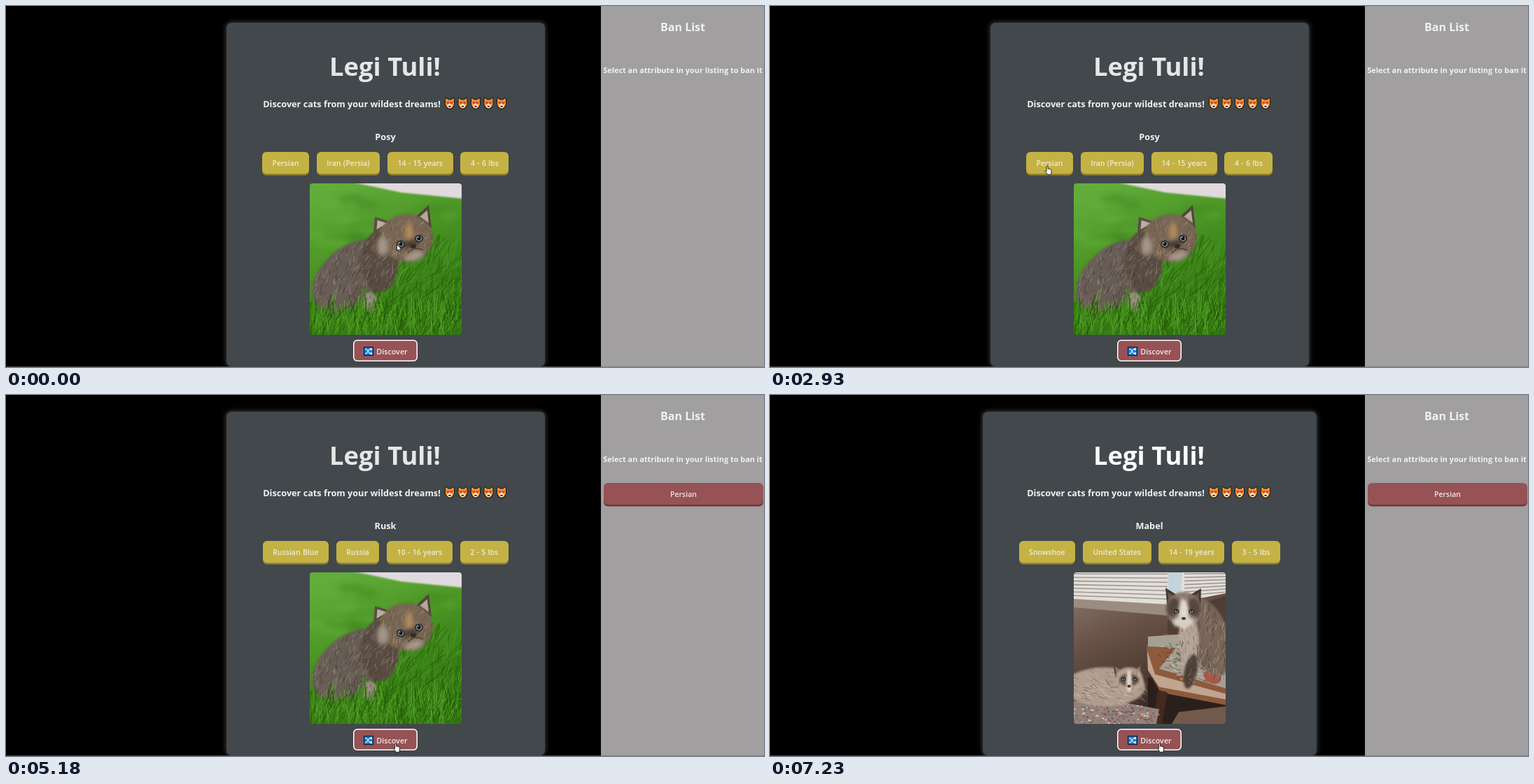
An HTML page with a canvas that plays this animation: 1083 by 517 pixels, repeating every 8 s.

```html
<!DOCTYPE html>
<html lang="en">
<head>
<meta charset="utf-8">
<title>Cat discovery</title>
<style>
html, body { margin: 0; width: 100%; height: 100%; overflow: hidden; background: #000; }
#stage { position: relative; width: 1083px; height: 517px; overflow: hidden; background: #000;
  font-family: "Open Sans", "Noto Sans", sans-serif; color: #f1f2f2; }
#stage > * { position: absolute; box-sizing: border-box; }
#frame { left: 0; top: 24px; width: 1085px; height: 492px; display: flex; justify-content: center; }
#card { display: flex; gap: 10.8px; padding: 185px 52px 0 51.5px; border-radius: 7px; background: #42484b;
  align-items: flex-start; box-shadow: 0 0 6px 1px rgba(140, 128, 126, .45); }
#side { left: 850px; top: 0; width: 233px; height: 517px; background: #a19f9f; }
#edge { left: 0; top: 516px; width: 1083px; height: 1px; background: rgba(105, 118, 118, .5); }
.text { width: 400px; height: 60px; line-height: 60px; text-align: center; white-space: nowrap; }
.btn { height: 31px; line-height: 33px; border-radius: 6px; text-align: center; white-space: nowrap;
  font-size: 10.5px; font-weight: 600; word-spacing: .6px; }
.tag { padding: 0 14.5px; background: #c4b245; color: #eeebd6; box-shadow: 0 2.5px 0 #968a32; }
.red { background: #965254; color: #f0e8e8; box-shadow: 0 2.5px 0 #6d3739; }
.tag.on { box-shadow: inset 0 0 0 1.5px #fff, 0 2.5px 0 #968a32; }
.red.on { box-shadow: inset 0 0 0 1.5px #fff; }
#discover { left: 496px; top: 478px; width: 92px; padding-left: 19px; font-size: 10.8px; }
#banned { left: 854px; top: 126px; width: 228px; }
.photo { left: 434px; top: 254px; border-radius: 4px; }
.over { left: 0; top: 0; }
</style>
</head>
<body>
<div id="stage">
  <div id="frame"><div id="card"></div></div>
  <div id="side"></div>
  <div id="discover" class="btn red">Discover</div>
  <div id="banned" class="btn red">Persian</div>
  <div id="edge"></div>
</div>
<script>
const W = 1083, H = 517, LOOP = 8000, SIZE = 217;
const $ = id => document.getElementById(id);
const stage = $('stage'), card = $('card');

function text(label, cx, cy, size) {
  const el = document.createElement('div');
  el.className = 'text';
  el.textContent = label;
  el.style.cssText = `left:${cx - 200}px; top:${cy - 30}px; font-size:${size}px; font-weight:700`;
  return stage.appendChild(el);
}
function canvas(w, h, cls) {
  const el = document.createElement('canvas');
  el.className = cls;
  el.width = w;
  el.height = h;
  return stage.appendChild(el);
}
function randomizer(seed) {
  return () => (seed = (seed * 16807) % 2147483647) / 2147483647;
}

function oval(g, fill, x, y, rx, ry = rx, turn = 0) {
  g.fillStyle = fill;
  g.beginPath();
  g.ellipse(x, y, rx, ry, turn, 0, 7);
  g.fill();
}
function poly(g, fill, ...pts) {
  g.fillStyle = fill;
  g.beginPath();
  pts.forEach(p => g.lineTo(...p));
  g.fill();
}
function backdrop(g, ...cols) {
  const f = g.createLinearGradient(60, 0, 150, SIZE);
  cols.forEach((c, i) => f.addColorStop(i / (cols.length - 1), c));
  g.fillStyle = f;
  g.fillRect(0, 0, SIZE, SIZE);
}
function soft(g, blur, draw) {
  g.filter = `blur(${blur}px)`;
  draw();
  g.filter = 'none';
}
// Short random strokes spread over a turned ellipse
function hairs(g, seed, n, [x, y, rx, ry, turn = 0], cols, len, angle, width = 1) {
  const rnd = randomizer(seed);
  const c = Math.cos(turn), s = Math.sin(turn);
  g.lineWidth = width;
  for (let i = 0; i < n; i++) {
    const r = Math.sqrt(rnd()), a = rnd() * 6.283;
    const u = r * rx * Math.cos(a), v = r * ry * Math.sin(a);
    const lean = angle + rnd() - .5, l = len * (.5 + rnd());
    const px = x + u * c - v * s, py = y + u * s + v * c;
    g.strokeStyle = cols[Math.floor(rnd() * cols.length)];
    g.beginPath();
    g.moveTo(px, py);
    g.lineTo(px + Math.cos(lean) * l, py + Math.sin(lean) * l);
    g.stroke();
  }
}
function fluff(g, seed, area, base, cols, len = 6, angle = 2) {
  soft(g, 1.5, () => oval(g, base, ...area));
  hairs(g, seed, area[2] * area[3] / 9, area, cols, len, angle);
}
// Triangle with a smaller one inside
function ear(g, outer, inner, ...pts) {
  const mid = k => (pts[0][k] + pts[1][k] + pts[2][k]) / 3;
  poly(g, outer, ...pts);
  poly(g, inner, ...pts.map(p => p.map((v, k) => mid(k) + (v - mid(k)) * .55)));
}
function eye(g, x, y, r, iris) {
  oval(g, '#2a2624', x, y, r + 1.5, r + 1);
  oval(g, iris, x, y, r, r * .9);
  oval(g, '#0e1418', x, y - .5, r * .55, r * .65);
  oval(g, '#fff', x - r * .3, y - r * .4, r * .16);
}

function drawKitten(g) {
  backdrop(g, '#62ac3c', '#4f9a28', '#3a8218', '#2f7212');
  const rnd = randomizer(5);
  soft(g, 5, () => {
    for (let i = 0; i < 26; i++) {
      oval(g, i % 2 ? '#3d861e88' : '#70b64866', rnd() * SIZE, 15 + rnd() * 90, 10 + rnd() * 18, 5);
    }
  });
  soft(g, 1, () => poly(g, '#e0dade', [50, -4], [220, -4], [220, 22], [130, 13]));
  hairs(g, 9, 420, [160, 160, 75, 75], ['#2c6a0c', '#3f8a18', '#4f9c26', '#276008'], 22, -1.1);
  const fur = ['#a3978c88', '#3a322c99', '#857a7077', '#51473e99'];
  fluff(g, 21, [58, 132, 64, 40, -.72], '#685d55', fur, 8);
  fluff(g, 22, [100, 112, 27, 44], '#5a4c42', fur, 8);
  fluff(g, 23, [86, 170, 10, 14], '#988c80', fur);
  ear(g, '#5c4d44', '#bcaea4', [91, 72], [93, 48], [119, 56]);
  ear(g, '#54453c', '#b8a79b', [151, 48], [170, 31], [174, 64]);
  fluff(g, 33, [138, 78, 38, 34], '#786654', ['#c2a88288', '#443a3288', '#b08a5a77', '#6a5c5288'], 7, 2.1);
  soft(g, 3, () => {
    oval(g, '#b08c5c', 142, 70, 6, 14);
    oval(g, '#463a32', 143, 87, 14, 5, -.25);
    oval(g, '#a8998c', 149, 104, 14, 6, -.3);
    oval(g, '#a49488', 104, 90, 8, 14);
  });
  eye(g, 130, 87, 4.5, '#78848a');
  eye(g, 156, 79, 4.5, '#78848a');
  oval(g, '#382824', 148, 90, 4, 3);
  g.strokeStyle = '#4a3932';
  g.lineWidth = 1.3;
  g.stroke(new Path2D('M140 100Q147 93 150 94Q157 92 162 96'));
  hairs(g, 41, 480, [108, 205, 130, 24], ['#2a6808', '#4a961c', '#57a42a', '#225806', '#3c8614'], 24, -1.35);
}

function drawGrey(g) {
  backdrop(g, '#fbfbfb', '#fbfbfb');
  soft(g, 4, () => {
    oval(g, '#8a8a8e', 26, 142, 52, 22, -.15);
    oval(g, '#68686c', 30, 180, 36, 13, .1);
    oval(g, '#98989b', 52, 184, 20, 13);
  });
  const fur = ['#b8b8ba55', '#5c5c6044', '#9e9ea155'];
  fluff(g, 17, [200, 140, 66, 92, .2], '#a0a0a3', fur, 8, 1.1);
  soft(g, 6, () => oval(g, '#4a4a4e', 142, 188, 24, 48, .45));
  ear(g, '#5c5c60', '#9d9da0', [27, 0], [86, 47], [48, 70]);
  ear(g, '#5c5c60', '#808084', [170, -16], [182, 60], [136, 50]);
  fluff(g, 18, [116, 88, 70, 48, .05], '#8e8e91', fur, 7, 1.3);
  fluff(g, 19, [90, 134, 36, 42, .35], '#919194', fur, 7, 1.3);
  soft(g, 6, () => {
    oval(g, '#6c6c70', 150, 128, 24, 12, -.6);
    oval(g, '#b4b4b7', 82, 100, 9, 32, .15);
    oval(g, '#c4c4c6', 84, 158, 22, 12);
  });
  eye(g, 59, 98, 9.5, '#b9d3c6');
  eye(g, 112, 98, 12, '#b9d3c6');
  poly(g, '#434347', [61, 143], [86, 144], [72, 156]);
  g.strokeStyle = '#4c4c50';
  g.lineWidth = 1.5;
  g.stroke(new Path2D('M72 154L74 162Q88 170 106 160M74 162Q66 164 63 156'));
  g.strokeStyle = '#f4f4f499';
  g.lineWidth = .8;
  for (let i = 0; i < 6; i++) {
    g.stroke(new Path2D(`M${92 + i * 3} ${154 + i}Q${126 + i * 5} 170 ${122 + i * 9} ${217 - i * 3}`));
  }
}

function drawPair(g) {
  backdrop(g, '#8a756a', '#685248', '#4c3932', '#2c201c');
  poly(g, '#9c8c80', [0, 36], [136, 46], [136, 62], [0, 50]);
  poly(g, '#e2dfdb', [0, 0], [217, 0], [217, 30], [136, 46], [0, 38]);
  g.lineWidth = 1.6;
  g.strokeStyle = '#9e978f';
  for (let y = 2; y < 36; y += 5.2) g.stroke(new Path2D(`M0 ${y}L134 ${y * 1.15}M158 ${y}L217 ${y * .85}`));
  poly(g, '#c3d4da', [135, 0], [155, 0], [152, 42], [134, 44]);
  poly(g, '#503e35', [134, 58], [217, 34], [217, 110], [134, 92]);
  poly(g, '#2b1f1b', [106, 150], [217, 180], [217, 217], [106, 217]);
  poly(g, '#725a4d', [150, 200], [217, 192], [217, 217], [140, 217]);
  poly(g, '#8d5a3e', [104, 104], [130, 88], [217, 100], [217, 190], [124, 172], [106, 140]);
  poly(g, '#c0a590', [105, 112], [116, 146], [217, 174], [217, 182], [122, 164], [106, 140]);
  poly(g, '#44291e', [120, 168], [134, 172], [126, 217], [114, 217]);
  poly(g, '#a5a094', [106, 92], [190, 86], [217, 128], [217, 166], [122, 138], [146, 108], [106, 106]);
  hairs(g, 61, 170, [166, 126, 48, 30, .35], ['#5f6a5a99', '#d0c2a899', '#8c4a4288', '#474a4499'], 6, .4, 1.6);
  oval(g, '#a4584a', 198, 150, 13, 9, .4);
  const fur = ['#cbbfb266', '#41332b88', '#8c786a77'];
  fluff(g, 71, [192, 92, 30, 58, -.35], '#78655a', fur, 8, 1.8);
  fluff(g, 72, [164, 98, 15, 34], '#b3a497', fur, 7, 1.8);
  fluff(g, 73, [167, 142, 9, 25, .2], '#4e4038', fur, 5);
  ear(g, '#443830', '#6a574b', [131, 22], [150, 34], [134, 54]);
  ear(g, '#443830', '#6a574b', [163, 34], [182, 23], [181, 54]);
  fluff(g, 74, [157, 53, 25, 25], '#8d7c70', fur, 5);
  soft(g, 2, () => {
    oval(g, '#56473d', 142, 50, 9, 14, .2);
    oval(g, '#56473d', 172, 50, 9, 14, -.2);
    oval(g, '#e2d9cf', 157, 60, 7, 22);
    oval(g, '#d8cec3', 157, 71, 15, 8);
  });
  [147, 168].forEach(x => eye(g, x, 56, 2.2, '#a9c2cc'));
  oval(g, '#4b3832', 157, 66, 3, 2);
  poly(g, '#94817a', [0, 184], [70, 186], [122, 196], [118, 217], [0, 217]);
  hairs(g, 81, 150, [55, 204, 66, 16], ['#5c5961', '#a9574d', '#cfc4b8', '#66727a'], 3, .4, 2);
  const cream = ['#e1d5c677', '#6a574a88', '#a28d7c88'];
  fluff(g, 91, [44, 164, 58, 28], '#b09d8e', cream, 8, .5);
  ear(g, '#574439', '#8a7265', [56, 130], [73, 140], [60, 154]);
  ear(g, '#574439', '#8a7265', [82, 140], [97, 129], [98, 153]);
  fluff(g, 92, [79, 154, 20, 18], '#b5a293', cream, 5);
  soft(g, 1.5, () => {
    oval(g, '#665045', 79, 154, 14, 9);
    oval(g, '#e0d4c6', 79, 156, 4, 16);
  });
  [71, 87].forEach(x => eye(g, x, 153, 1.8, '#adc0c4'));
  oval(g, '#46352e', 79, 163, 2.6, 2);
}

function drawEmoji(g, x) {
  g.save();
  g.translate(x, 139.5);
  g.scale(.87, .98);
  const face = new Path2D('M-6.5 -8L-2.5 -5H2.5L6.5 -8L7 1Q5 7 0 7.5Q-5 7 -7 1Z');
  g.lineJoin = 'round';
  g.lineWidth = 2;
  g.strokeStyle = '#16120f';
  g.stroke(face);
  g.fillStyle = '#f5a336';
  g.fill(face);
  oval(g, '#fbe3c0', 0, 3.6, 4.2, 3.2);
  g.fillStyle = '#e8432f';
  for (const c of [-3, 3]) {
    g.fill(new Path2D(`M${c} 1.5C${c - 4.5} -1 ${c - 2.4} -4.5 ${c} -2.2C${c + 2.4} -4.5 ${c + 4.5} -1 ${c} 1.5`));
  }
  g.fillStyle = '#2a1512';
  g.fill(new Path2D('M-2.6 3.6H2.6Q0 7.4 -2.6 3.6'));
  g.restore();
}
function drawShuffle(g) {
  g.fillStyle = '#11151a';
  g.fillRect(511, 488, 14, 13);
  g.fillStyle = '#1479d4';
  g.fillRect(512, 489, 12, 11);
  g.strokeStyle = '#fff';
  g.lineWidth = 1.1;
  g.stroke(new Path2D('M513 491.5H515L519.5 497.5H522.5M513 497.5H515L519.5 491.5H522.5M521 490L522.7 491.5L521 493M521 496L522.7 497.5L521 499'));
}

const pointers = {
  arrow: new Path2D('M.5 .5V9.6L2.6 7.7L4 11L5.6 10.3L4.2 7.2H7Z'),
  hand: new Path2D('M2.6 8.4V1.5Q3.6 -.2 4.6 1.5V5.2Q6 4.5 6.4 5.5Q7.6 5 8 6Q9.6 5.7 9.6 7.2V10Q9.5 11.8 8.5 13.4H4.2Q3 11.3 .7 8.8Q.8 7.2 2.6 8.4Z'),
  beam: new Path2D('M1 .5H3M4 .5H6M3.5 1V10.5M1 11H3M4 11H6')
};
function drawPointer(g, [x, y], kind) {
  const flat = kind === 'beam';
  g.save();
  g.translate(x, y);
  g.lineJoin = 'round';
  g.fillStyle = '#fff';
  g.strokeStyle = flat ? '#f4f4f4' : '#111';
  g.lineWidth = .9;
  if (!flat) g.fill(pointers[kind]);
  g.stroke(pointers[kind]);
  g.restore();
}

const title = text('Legi Tuli!', 541.5, 85.5, 36.4);
text('Discover cats from your wildest dreams!', 494, 139.7, 12.7);
const name = text('', 542, 187, 12.7);
text('Ban List', 967, 29.8, 16);
text('Select an attribute in your listing to ban it', 967, 91.7, 10.9);
const photos = [drawKitten, drawGrey, drawPair].map(draw => {
  const el = canvas(SIZE, SIZE, 'photo');
  draw(el.getContext('2d'));
  return el;
});
const icons = canvas(W, H, 'over').getContext('2d');
for (let i = 0; i < 5; i++) drawEmoji(icons, 634 + i * 18.5);
drawShuffle(icons);
const layer = canvas(W, H, 'over').getContext('2d');

// The photo of each listing arrives after its text
const listings = [
  { at: 0, photoAt: 0, name: 'Posy', tags: ['Persian', 'Iran (Persia)', '14 - 15 years', '4 - 6 lbs'] },
  { at: 5180, photoAt: 5610, name: 'Rusk', tags: ['Russian Blue', 'Russia', '10 - 16 years', '2 - 5 lbs'] },
  { at: 6950, photoAt: 7230, name: 'Mabel', tags: ['Snowshoe', 'United States', '14 - 19 years', '3 - 5 lbs'] }
];

// Turning points of the pointer: time, x, y
const STEP = 132.4, FIRST = 530;
const path = [
  [430, 558, 341], [800, 672, 314], [950, 634, 277], [1340, 383, 152], [1460, 428, 133], [1850, 702, 140],
  [2120, 521.5, 217], [2390, 520, 405], [2510, 411, 259], [2780, 392.5, 228], [3450, 392.5, 228],
  [3720, 770, 148], [3870, 956, 128], [4500, 502, 494], [4770, 553, 498]
];
function pointerAt(t) {
  t = FIRST + Math.floor((t - FIRST + 5) / STEP) * STEP;
  const i = path.findIndex(p => p[0] > t);
  if (i < 1) return path[i < 0 ? path.length - 1 : 0].slice(1);
  const [a, b] = [path[i - 1], path[i]];
  const k = (t - a[0]) / (b[0] - a[0]);
  return [a[1] + (b[1] - a[1]) * k, a[2] + (b[2] - a[2]) * k];
}
function pointerKind([x, y]) {
  const over = (x0, y0, x1, y1) => x > x0 && x < x1 && y > y0 && y < y1;
  if (over(367, 130, 621, 146)) return 'beam';
  const button = over(365, 209, 719, 243) || over(496, 478, 588, 511) || over(854, 126, 1082, 160);
  return button ? 'hand' : 'arrow';
}

let shown = -1;
function showListing(index) {
  if (shown === index) return;
  shown = index;
  name.textContent = listings[index].name;
  title.style.color = index === 2 ? '#fbfbfb' : '#e5e7e7';
  card.replaceChildren(...listings[index].tags.map(label => {
    const el = document.createElement('div');
    el.className = 'btn tag';
    el.textContent = label;
    return el;
  }));
}

function render(t) {
  showListing(listings.filter(l => l.at <= t).length - 1);
  const photo = listings.filter(l => l.photoAt <= t).length - 1;
  photos.forEach((p, i) => p.style.visibility = i === photo ? 'visible' : 'hidden');
  const picked = t >= 3300 && t < 4770;
  card.firstChild.classList.toggle('on', picked);
  $('discover').classList.toggle('on', !picked);
  $('banned').style.visibility = t >= 3450 ? 'visible' : 'hidden';
  const spot = pointerAt(t);
  layer.clearRect(0, 0, W, H);
  drawPointer(layer, spot, pointerKind(spot));
}

const start = performance.now();
function tick() {
  render((performance.now() - start) % LOOP);
  requestAnimationFrame(tick);
}
tick();
</script>
</body>
</html>
```
